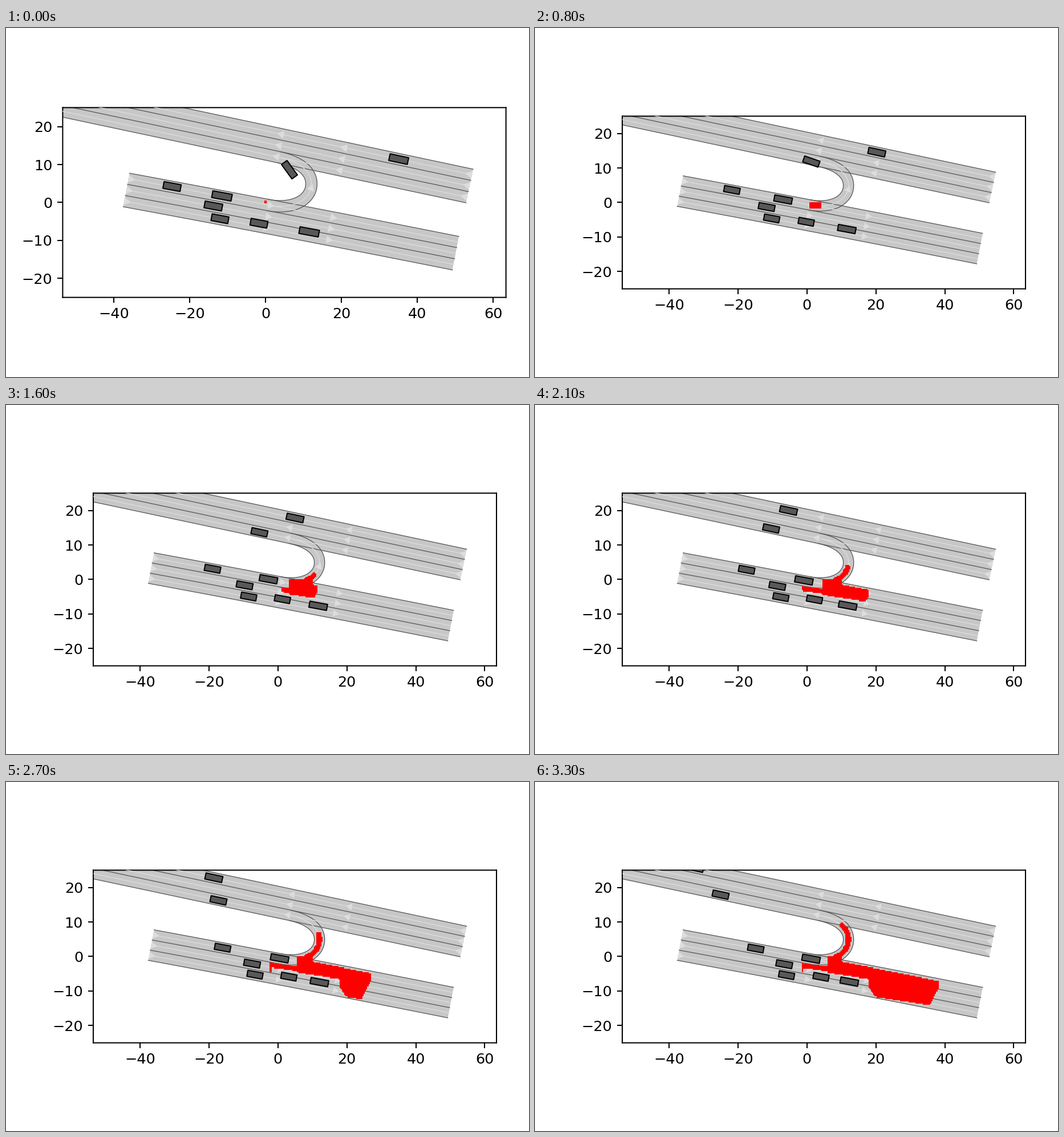
These frames come from a looping animation (917 by 611 pixels, 3400 ms). A matplotlib script:

```python
import numpy as np
import matplotlib.pyplot as plt
from matplotlib.animation import FuncAnimation
from matplotlib.collections import PolyCollection
from matplotlib.colors import ListedColormap
from matplotlib.patches import Polygon

W, H = 917, 611
FRAMES, STEP = 34, 100
PT = 1.834  # scale of point sizes at 100 dpi
FILL, BOUND, LIGHT, CAR = "#c7c7c7", "#555555", "#dddddd", "#585858"

plt.rcParams.update({
    "font.family": "DejaVu Sans", "font.size": 10 * PT,
    "axes.linewidth": 0.8 * PT,
    "xtick.major.width": 0.8 * PT, "ytick.major.width": 0.8 * PT,
    "xtick.major.size": 3.5 * PT, "ytick.major.size": 3.5 * PT,
    "xtick.major.pad": 3.5 * PT, "ytick.major.pad": 3.5 * PT,
})

fig = plt.figure(figsize=(W / 100 + 1e-4, H / 100 + 1e-4), dpi=100)
ax = fig.add_axes([0.1, 0.2, 0.8, 0.5])
ax.set(xlim=(-53.55, 63.4), ylim=(-25, 25),
       xticks=range(-40, 61, 20), yticks=range(-20, 21, 10))
for spine in ax.spines.values():
    spine.set_snap(False)


def place_axes(left, right):
    height = (right - left) / 116.95 * 50
    ax.set_position([left / W, 0.5 - height / 2 / H,
                     (right - left) / W, height / H])


# --- road network ---

def fill(pts):
    ax.add_patch(Polygon(pts, fc=FILL, ec="none", zorder=1))


def line(pts, color, z=2):
    ax.plot(*np.transpose(pts), color=color, lw=0.5 * PT, zorder=z)


def arrow(base, d):
    n = np.array([-d[1], d[0]])
    ax.add_patch(Polygon([base + n, base + 1.85 * d, base - n],
                         fc=LIGHT, ec="none", zorder=11))


def road(start, end, sections, lanes=3, width=3.0, bow=0.0):
    """Parallel lanes, slightly bowed away from their lower side."""
    a, b = np.array(start), np.array(end)
    length = np.hypot(*(b - a))
    d = (b - a) / length
    down = np.array([-d[1], d[0]]) * (-1 if d[0] > 0 else 1)

    def at(s, lane):
        u = np.atleast_1d(s)[:, None] / length
        return a + u * (b - a) + (lane * width - 4 * bow * u * (1 - u)) * down

    s = np.linspace(0, length, 40)
    fill(np.vstack([at(s, 0), at(s, lanes)[::-1]]))
    for k in range(lanes + 1):
        line(at(s, k), BOUND)
    for k in range(lanes):
        line(at(s, k + 0.5), LIGHT, 10)
        for base in at(sections, k + 0.5):
            arrow(base, d)


def bezier(p, t):
    p0, p1, p2, p3 = np.array(p)
    t = t[:, None]
    return ((1 - t) ** 3 * p0 + 3 * t * (1 - t) ** 2 * p1
            + 3 * t ** 2 * (1 - t) * p2 + t ** 3 * p3)


def u_turn():
    t = np.linspace(0, 1, 41)
    mid = np.vstack([
        bezier([(0.5, -0.65), (7.57, -2.0), (12.07, 0.9), (12.07, 4.9)], t),
        bezier([(12.07, 4.9), (12.07, 8.4), (8.7, 10.8), (3.5, 11.9)], t)[1:],
    ])
    d = np.gradient(mid, axis=0)
    d /= np.hypot(d[:, 0], d[:, 1])[:, None]
    n = np.column_stack([-d[:, 1], d[:, 0]]) * 1.5
    fill(np.vstack([mid + n, (mid - n)[::-1]]))
    line(mid + n, BOUND)
    line(mid - n, BOUND)
    line(mid, LIGHT, 10)
    arrow(mid[34], d[34])
    return mid


road((-35.9, 7.72), (50.97, -8.93), (0, 37.4, 54.25), bow=0.15)
road((54.75, 8.78), (-62, 33.53), (0, 33.7, 50.75), width=3.02)
turn = u_turn()


# --- cars ---

# start, end, lead over constant speed, length
CARS = [
    ((35.1, 11.43), (-32.5, 25.75), -0.04, 5.0),
    ((-24.7, 4.2), (-14.84, 2.32), 0.10, 4.6),
    ((-11.53, 1.73), (1.2, -0.66), 0.21, 5.2),
    ((-13.8, -0.92), (-6.57, -2.23), 0.09, 4.7),
    ((-12.06, -4.28), (-5.9, -5.4), 0.10, 4.5),
    ((-1.76, -5.47), (4.1, -5.9), 0.04, 4.5),
    ((11.47, -7.74), (12.3, -7.28), -0.22, 5.2),
]


def rect(x, y, length, deg, width=1.8):
    c, s = np.cos(np.radians(deg)), np.sin(np.radians(deg))
    box = np.array([(-1, -1), (1, -1), (1, 1), (-1, 1)]) * (length / 2, width / 2)
    return box @ np.array([(c, s), (-s, c)]) + (x, y)


def turning_car(t):
    """Leaves the turn, then settles on the lower lane of the upper road."""
    x = 6.28 - 0.52 * t - 0.013 * t ** 2
    y = 12.63 - 0.2105 * x - 2.67 * np.exp(-t / 4.8)
    return rect(x, y, 4.7, -12 - 42 * np.exp(-(t / 6) ** 2))


def car_shapes(t):
    u = t / (FRAMES - 1)
    shapes = [turning_car(t)]
    for (x0, y0), (x1, y1), lead, length in CARS:
        e = u + lead * np.sin(np.pi * u ** 1.15)
        shapes.append(rect(x0 + (x1 - x0) * e, y0 + (y1 - y0) * e,
                           length, -12 if y0 > 8 else -10.5))
    return shapes


# --- reachable area on a grid of cells ---

CELL = 0.35
cols, rows = np.arange(-12, 120), np.arange(-46, 34)
X, Y = np.meshgrid((cols + 0.5) * CELL, (rows + 0.5) * CELL)
extent = [cols[0] * CELL, (cols[-1] + 1) * CELL,
          rows[0] * CELL, (rows[-1] + 1) * CELL]


def lane_top(x):
    return np.where(x < 10.3, -0.15, 0.5 - 0.2 * x)


def body(t):
    """Main stretch: rear and front move apart and it widens past x = 18."""
    rear = min(0.29 * t - 0.35, 0.75) + 6 * (1 - np.exp(-max(t - 11, 0) / 10))
    front = 0.35 + 0.27 * t + 0.0265 * t ** 2
    top = lane_top(X) + 0.5 * max(0, 1 - t / 8)
    wide = np.maximum(-8.5 - 0.158 * X, -9 - 1.5 * (X - 18))
    bottom = np.where(X > 18, wide, -3.85 - 0.15 * X)
    bottom = np.maximum(bottom, -0.4 - 0.0236 * t ** 2)
    bottom = np.maximum(bottom, lane_top(front) - 2 - 2 * (front - X))
    return (X > rear) & (X < front) & (Y < top) & (Y > bottom)


def tail(t):
    start = -2.3 + 0.028 * (t - 27) ** 2
    strip = (X > start) & (X < 7) & (Y < -2.1 - 0.15 * X) & (Y > -3.45 - 0.14 * X)
    hook = (abs(X - start - 0.2) < 0.2) & (Y < -2) & (Y > -4.5) & (t >= 24)
    return (strip | hook) & (t >= 13)


def arm(t):
    """Band that climbs along the middle of the turn."""
    path = turn[18:max(18, int(27 + 1.9 * (t - 16)))]
    near = np.zeros(X.shape, bool)
    for x, y in path:
        near |= np.hypot(X - x, Y - y) < 0.75
    return near


def area(t):
    return np.where(body(t) | tail(t) | arm(t), 1.0, np.nan)


cars = PolyCollection([], fc=CAR, ec="black", lw=0.8 * PT, zorder=20)
ax.add_collection(cars, autolim=False)
red = ax.imshow(area(0), extent=extent, origin="lower", aspect="auto",
                cmap=ListedColormap(["red"]), vmin=0, vmax=1,
                interpolation="nearest", zorder=30)


def update(i):
    place_axes(*((99.4, 876.6) if i == 0 else (153, 860)))
    cars.set_verts(car_shapes(i))
    red.set_data(area(i))
    return cars, red


anim = FuncAnimation(fig, update, frames=FRAMES, interval=STEP,
                     repeat=True, repeat_delay=0, blit=False)
plt.show()
```
